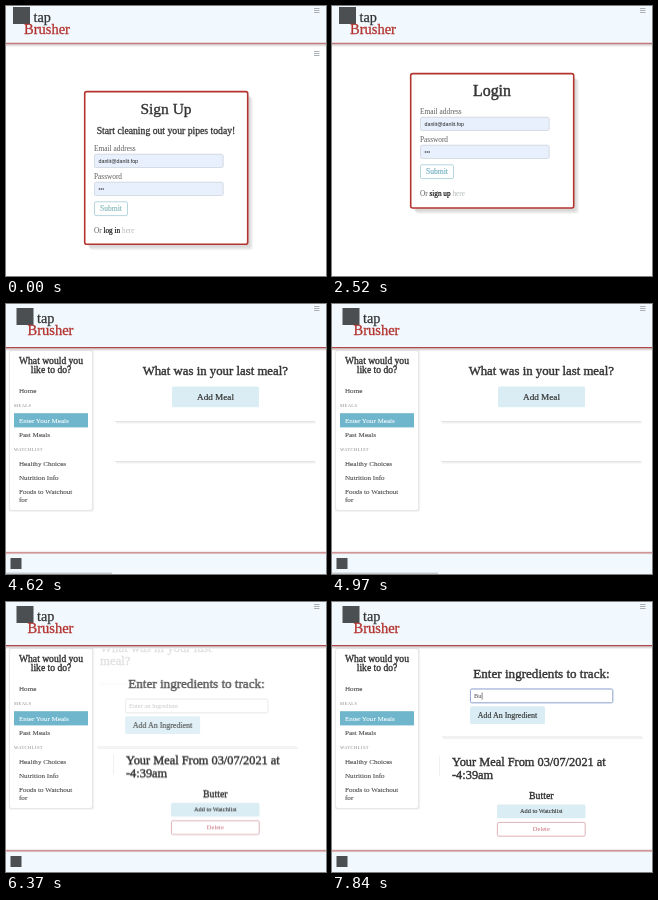
Write an HTML page that moves like this. It is 320 px wide and 270 px high and loops after 8000 ms.

```html
<!DOCTYPE html>
<html lang="en">
<head>
<meta charset="utf-8">
<title>Meal tracker walkthrough</title>
<style>
  html, body { margin: 0; width: 100%; height: 100%; overflow: hidden; background: #fff; }
  svg { display: block; width: 320px; height: 270px; font-family: "Liberation Serif", serif; }
  .sans { font-family: "Liberation Sans", sans-serif; }
</style>
</head>
<body>
<svg id="stage" viewBox="0 0 320 270">
  <defs>
    <clipPath id="newClip"><rect x="92" y="47" width="220" height="86"/></clipPath>
    <clipPath id="oldClip"><rect x="92" y="47" width="220" height="74"/></clipPath>
  </defs>
</svg>
<script>
const LOOP = 8000;
const INK = '#333', GREY = '#5c5c5c', RED = '#b4332f', TEAL = '#6fb5cc';
const SKY = '#f1f9fe', PALE = '#daedf4', FILLED = '#e8f0fe';
const stage = document.getElementById('stage');

function add(parent, tag, attrs = {}, text) {
  const el = document.createElementNS('http://www.w3.org/2000/svg', tag);
  for (const k in attrs) el.setAttribute(k, attrs[k]);
  if (text) el.textContent = text;
  parent.appendChild(el);
  return el;
}

const group = (parent, attrs) => add(parent, 'g', attrs);

const box = (p, x, y, width, height, fill, extra) =>
  add(p, 'rect', { x, y, width, height, fill, ...extra });

// bold is the extra stroke weight in pixels
function label(p, x, y, size, text, { fill = INK, bold = 0, mid = false, ...extra } = {}) {
  return add(p, 'text', {
    x, y, fill, 'font-size': size, stroke: fill, 'stroke-width': bold,
    'text-anchor': mid ? 'middle' : 'start', ...extra
  }, text);
}

// rows: [time, properties, easing to the next row]
function loop(el, rows) {
  const keys = rows.map(([t, props, easing = 'step-end']) => ({ ...props, easing, offset: t / LOOP }));
  if (keys[0].offset > 0) keys.unshift({ ...keys[0], offset: 0, easing: 'step-end' });
  const last = keys[keys.length - 1];
  if (last.offset < 1) keys.push({ ...last, offset: 1 });
  el.animate(keys, { duration: LOOP, iterations: Infinity });
  return el;
}

function span(el, from, to = LOOP) {
  const rows = from > 0 ? [[0, { opacity: 0 }]] : [];
  rows.push([from, { opacity: 1 }]);
  if (to < LOOP) rows.push([to, { opacity: 0 }]);
  return loop(el, rows);
}

const at = (x, y, opacity) => ({ transform: `translate(${x}px, ${y}px)`, opacity });

function burger(p, y) {
  for (let i = 0; i < 3; i++) box(p, 308, y + i * 2, 5.5, 1, '#aab0b4');
}

function ruleShadow(p, x, y, width) {
  box(p, x, y, width, 1, '#e3e3e3', { rx: 0.5 });
  box(p, x + 1, y + 1, width, 1.6, '#f1f1f1', { rx: 0.8 });
}

function header(p, height, dx, dy) {
  box(p, 0, 0, 320, height, SKY);
  box(p, 0, height, 320, 1, '#b0474a');
  ['#c9b4b6', '#e2d8d9', '#f4f0f0'].forEach((c, i) => box(p, 0, height + 1 + i, 320, 1, c));
  const logo = group(p, { transform: `translate(${dx} ${dy})` });
  box(logo, 7, 1, 17, 17, '#4c4f52');
  label(logo, 27.5, 16, 14.2, 'tap', { bold: 0.25 });
  label(logo, 18, 28, 14.5, 'Brusher', { fill: RED, bold: 0.3 });
  burger(p, 2);
}

function button(p, x, y, w, h, text, size, { fill = PALE, ink = INK, stroke = 'none', bold = 0.1 } = {}) {
  box(p, x, y, w, h, fill, { rx: 1.5, stroke, 'stroke-width': 0.8 });
  label(p, x + w / 2, y + h / 2 + size * 0.31, size, text, { fill: ink, bold, mid: true });
}

function field(p, x, y, w, h, stroke = '#dadde1', fill = '#fff') {
  box(p, x, y, w, h, fill, { rx: 1.5, stroke, 'stroke-width': 0.8 });
}

function filledFields(p) {
  field(p, 88.5, 111.3, 128.5, 13.2, '#d3dae4', FILLED);
  field(p, 88.5, 139.3, 128.5, 13.2, '#d3dae4', FILLED);
  label(p, 92.5, 119.9, 5.3, 'danlit@danlit.fop', { class: 'sans', fill: '#222' });
  for (let i = 0; i < 3; i++) add(p, 'circle', { cx: 93.4 + i * 1.9, cy: 146, r: 0.75, fill: '#333' });
}

function authCard(p, top, height) {
  for (let i = 4; i > 0; i--)
    box(p, 80 + i, top + 2 + i, 163, height, '#000', { rx: 3, opacity: 0.04 });
  box(p, 78.7, top, 163, height, '#fff', { rx: 2, stroke: RED, 'stroke-width': 1.6 });
}

function authForm(p, dy, submitInk, link) {
  const g = group(p, { transform: `translate(0 ${dy})` });
  label(g, 88, 108, 7.4, 'Email address', { fill: GREY });
  label(g, 88, 136, 7.3, 'Password', { fill: GREY });
  field(g, 88.5, 111.3, 128.5, 13.2);
  field(g, 88.5, 139.3, 128.5, 13.2);
  label(g, 92.5, 120, 6, 'Email', { fill: '#b9bdc1' });
  label(g, 92.5, 148, 6.4, 'Password', { fill: '#b9bdc1' });
  button(g, 88.5, 158.8, 33, 13.8, 'Submit', 7.6, { fill: '#fff', ink: submitInk, stroke: '#a3ccd7', bold: 0.2 });
  const line = label(g, 88, 189.5, 7.25, 'Or ', { fill: GREY });
  add(line, 'tspan', { fill: '#111', stroke: '#111', 'stroke-width': 0.2 }, link);
  const here = add(line, 'tspan', { fill: '#b5bcb8', stroke: 'none' }, ' here');
  return { g, here };
}

// Sign up and login
const auth = span(group(stage), 0, 3500);
header(auth, 36.8, 0, 0);

const signUp = span(group(auth), 0, 1610);
burger(signUp, 45);
authCard(signUp, 85.6, 152.6);
label(signUp, 160, 108, 15.5, 'Sign Up', { bold: 0.35, mid: true });
label(signUp, 160, 127.6, 9.7, 'Start cleaning out your pipes today!', { bold: 0.28, mid: true });
const joined = authForm(signUp, 37, '#8dbdbb', 'log in');
filledFields(joined.g);
loop(joined.here, [[0, { fill: '#b5bcb8' }], [1050, { fill: '#7d8a86' }]]);

const login = span(group(auth), 1610, 3500);
authCard(login, 67.6, 134.4);
label(login, 160, 90, 15.9, 'Login', { bold: 0.45, mid: true });
const entry = authForm(login, 0, '#79b3c4', 'sign up');
filledFields(span(group(entry.g), 2240, 3500));

// Main area
const home = span(group(stage), 3500, 4620);
label(home, 95, 65, 19.2, 'Welcome', { bold: 0.5 });
label(home, 209, 101.5, 15.5, 'Latest Meal:', { bold: 0.45, mid: true });
ruleShadow(home, 109, 125, 199);

const HEAD = { bold: 0.4 };
const ask = span(group(stage), 4620, 6020);
label(ask, 209.3, 71, 12.8, 'What was in your last meal?', { ...HEAD, mid: true });
button(ask, 166, 82.5, 87, 20.7, 'Add Meal', 9.2, { bold: 0.2 });
ruleShadow(ask, 109, 117, 200);
ruleShadow(ask, 109, 157, 200);

// The old question wraps and slips away to the upper left
const leaving = group(group(stage, { 'clip-path': 'url(#oldClip)' }));
label(leaving, 112, 66, 12.8, 'What was in your last', HEAD);
label(leaving, 112, 79, 12.8, 'meal?', HEAD);
ruleShadow(leaving, 107, 97, 143);
loop(leaving, [
  [0, at(10, 4, 0)],
  [6020, at(10, 4, 1), 'linear'],
  [6160, at(0, 0, 0.8), 'linear'],
  [6300, at(-14, -12, 0.3), 'linear'],
  [6440, at(-22, -20, 0)]
]);

// The ingredient form opens narrow, then widens and settles
const narrow = group(group(stage, { 'clip-path': 'url(#newClip)' }));
label(narrow, 98, 126, 13.1, 'Enter', HEAD);
label(narrow, 98, 139.5, 13.1, 'ingredients', HEAD);
loop(narrow, [
  [0, at(-4, 4, 0)],
  [6090, at(-4, 4, 0.1), 'linear'],
  [6160, at(0, 0, 0.28), 'linear'],
  [6230, at(4, -6, 0.45)],
  [6240, at(4, -6, 0)]
]);

const form = group(stage);
label(form, 209.5, 76, 13.1, 'Enter ingredients to track:', { ...HEAD, mid: true });
field(form, 138.4, 87, 142.4, 13.8);
span(box(form, 138.4, 87, 142.4, 13.8, '#fff', { rx: 1.5, stroke: '#8ea6d4', 'stroke-width': 1 }), 6930);
span(label(form, 142, 96, 6.35, 'Enter an Ingredient', { fill: '#b9bdc1' }), 0, 7490);
button(form, 138, 104.3, 75, 17.8, 'Add An Ingredient', 7.95, { bold: 0.15 });
ruleShadow(form, 110, 134.5, 200);
span(label(form, 142, 96, 6.3, 'B', { fill: '#444' }), 7490, 7700);
span(label(form, 142, 96, 6.3, 'Bu', { fill: '#444' }), 7700);
const caret = box(form, 142, 90.5, 0.6, 7, '#333');
loop(caret, [
  [0, at(0, 0, 0)],
  [6930, at(0, 0, 1)],
  [7490, at(4.4, 0, 1)],
  [7700, at(7.6, 0, 1)]
]);
loop(form, [
  [0, at(-25, 14, 0)],
  [6235, at(-25, 14, 0.5), 'linear'],
  [6370, at(-19, 10, 0.82), 'ease-out'],
  [6720, at(0, 0, 1)]
]);

const meal = group(stage);
label(meal, 120, 164.2, 12.35, 'Your Meal From 03/07/2021 at', HEAD);
label(meal, 120, 177.2, 12.35, '-4:39am', HEAD);
box(meal, 107, 154, 0.8, 20, '#ededed');
label(meal, 209.3, 197, 9.8, 'Butter', { bold: 0.35, mid: true });
button(meal, 165, 202.5, 88.5, 13.8, 'Add to Watchlist', 6.35);
button(meal, 165.4, 220.4, 87.8, 13.8, 'Delete', 6.5, { fill: '#fff', ink: '#c96a78', stroke: '#d6a0a8', bold: 0 });
loop(meal, [
  [0, at(0, -9, 0)],
  [6090, at(0, -9, 1), 'linear'],
  [6160, at(0, -7, 1), 'linear'],
  [6370, at(0, -1.7, 1), 'ease-out'],
  [6580, at(0, 0, 1)]
]);

// Header, sidebar and footer shared by the inner pages
const shell = span(group(stage), 3500);
header(shell, 43, 3.5, 3);
for (let i = 3; i > 0; i--)
  box(shell, 4 - i / 2, 47 - i / 3, 82 + i * 1.3, 159 + i, '#000', { rx: 2, opacity: 0.035 });
box(shell, 4, 47, 82, 159, '#fff', { rx: 2 });
label(shell, 45, 60, 9.6, 'What would you', { bold: 0.35, mid: true });
label(shell, 45, 69.4, 9.6, 'like to do?', { bold: 0.35, mid: true });
[['MEALS', 103], ['WATCHLIST', 146.6]].forEach(([text, y]) =>
  label(shell, 8, y, 4.5, text, { fill: '#888', 'letter-spacing': 0.45 }));
[
  ['Home', 89], ['Enter Your Meals', 118.5], ['Past Meals', 132.5], ['Healthy Choices', 161.5],
  ['Nutrition Info', 176], ['Foods to Watchout', 190.2], ['for', 198]
].forEach(([text, y]) => label(shell, 13, y, 7.1, text, { fill: '#4a4a4a', bold: 0.1 }));

function active(text, y, from, to) {
  const g = span(group(shell), from, to);
  box(g, 8, y, 74, 14.2, TEAL);
  label(g, 13, y + 9.3, 7.1, text, { fill: '#f4fbfd', bold: 0.1 });
}
active('Home', 79.8, 3500, 4620);
active('Enter Your Meals', 109.2, 4620);

['#eadfe0', '#b9575a', '#d3bcbe'].forEach((c, i) => box(shell, 0, 247.4 + i, 320, 1, c));
box(shell, 0, 250.2, 320, 20, SKY);
box(shell, 4.5, 254, 11, 11, '#4c4f52');

// Browser status strip
function status(width, from, to) {
  const g = span(group(stage), from, to);
  box(g, 0, 268.3, width, 1, '#d8dcde');
  box(g, 0, 269, width, 1, '#c6cacc');
}
status(79, 1050, 1960);
status(106, 3220, 5390);
</script>
</body>
</html>
```
